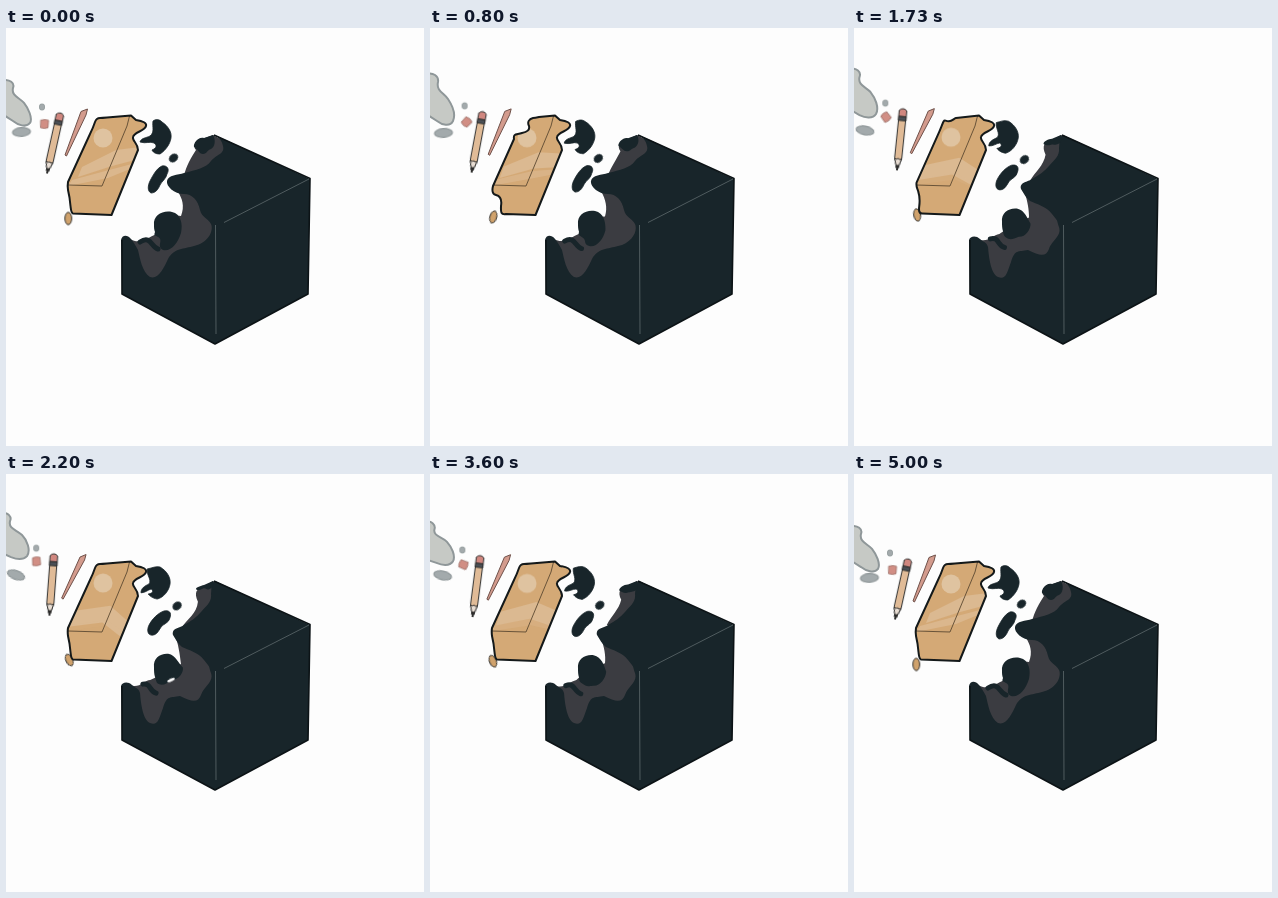
Animation of 418 by 418 pixels, one loop 5.03 s. Source, as an HTML page without scripts:

```html
<!DOCTYPE html>
<html lang="en">
<head>
<meta charset="utf-8">
<title>Dissolving cube</title>
<style>
html, body { margin: 0; width: 100%; height: 100%; overflow: hidden; background: #fdfdfd; }
svg { display: block; width: 100vw; height: 100vh; }

/* Parts that drift there and back */
.sway { animation: 2515ms cubic-bezier(.37,0,.63,1) infinite alternate; }
/* Parts with their own course over the whole loop */
.loop { animation: 5030ms linear infinite; }

.ink { fill: #18252a; }
.line { stroke: #30302f; stroke-width: 1; stroke-linejoin: round; }

.smoke { animation-name: smoke; }
@keyframes smoke {
  16% { d: path("M-4 46C3 44 9 48 8 54C6 63 14 65 18 71C22 77 26 86 23 93C20 99 12 97 7 93L-4 86Z"); }
  25% { d: path("M-4 43C3 41 9 45 7 51C5 59 13 62 17 67C21 73 26 83 23 90C20 97 11 94 6 91L-4 84Z"); }
  44% { d: path("M-4 39C2 38 6 43 4 47C2 55 11 56 16 61C21 66 25 76 21 82C17 86 10 85 5 83L-4 79Z"); }
  60% { d: path("M-4 43C1 43 5 47 3 51C1 58 11 59 16 64C21 69 25 78 22 83C18 87 10 86 5 84L-4 82Z"); }
  84% { d: path("M-4 52C2 51 7 55 6 60C5 67 14 67 18 72C22 77 27 86 24 92C21 98 14 97 8 94L-4 89Z"); }
}
.puff { animation-name: puff; }
@keyframes puff {
  0%, 100% { transform: translate(15.5px,104px) rotate(-4deg); }
  16% { transform: translate(13.5px,105px) rotate(-4deg); }
  25% { transform: translate(12px,104px) rotate(2deg); }
  44% { transform: translate(10px,101px) rotate(20deg); }
  60% { transform: translate(11px,100px) rotate(20deg); }
  84% { transform: translate(14.5px,103px) rotate(4deg); }
}
.speck { animation-name: speck; }
@keyframes speck {
  from { transform: translate(36px,79px); }
  to { transform: translate(30px,74px); }
}
.crumb { animation-name: crumb; }
@keyframes crumb {
  from { transform: translate(38.3px,96px) rotate(5deg); }
  to { transform: translate(30.3px,87px) rotate(185deg); }
}
.pencil { animation-name: pencil; }
@keyframes pencil {
  from { transform: translate(41px,145.5px) rotate(12.5deg); }
  to { transform: translate(43.5px,141.5px) rotate(4deg); }
}
.stick { animation-name: stick; }
@keyframes stick { to { d: path("M74 83L80 80.5L78.5 86L57 125L55.5 124Z"); } }

.box { animation-name: box; }
@keyframes box {
  0%, 38%, 100% { d: path("M84 106C86.5 101 88 97 89 94C90 91 91 90 94 90C96 90 99 89.7 101 89.5L125 87.5L130 92C137 93 141 95 140 98C139 103 128 104 127 109C126 113 132 115 132 122L105.5 187L67 185.5C65 185 65 182 64.5 178C64 172 63 166 62 162C61.5 158 61.5 157 62 154Z"); }
  16% { d: path("M84 111C83 105 87 107 92 105C97 104 100 102 99 98C97 94 99 91 103 90C105 90 107 89.5 109 89L125 87.5L130 92C137 93 141 95 140 98C139 103 128 104 127 109C126 113 132 115 132 122L105.5 187L76 186C70 187 71 183 71 178C72 172 70 168 66 167C62 166 62 162 63 158Z"); }
  25% { d: path("M88 99C88.5 97 89 93 91 92C93 92 90 101 97 102C104 102 101 94 105 91L125 87.5L130 92C137 93 141 95 140 98C139 103 128 104 127 109C126 113 132 115 132 122L105.5 187L71 185.5C65 187 64 182 67 180C71 177 72 171 70 167C68 164 63 165 64 156Z"); }
}
.tape { animation-name: tape; }
@keyframes tape { to { d: path("M67 137L104 132L121 148L114 164L96 149L62 153Z"); } }
.glint { animation-name: glint; }
@keyframes glint { to { d: path("M64 151L101 146L119 160L117 165L100 152L60 157Z"); opacity: 0; } }
.badge { animation-name: badge; }
@keyframes badge { to { transform: translateY(-1px); } }
.drip { animation-name: drip; }
@keyframes drip {
  0%, 100% { transform: translate(62.3px,190.5px) rotate(0deg); }
  16% { transform: translate(63.3px,189px) rotate(16deg); }
  25% { transform: translate(63px,188px) rotate(5deg); }
  44%, 60% { transform: translate(63.3px,186px) rotate(-25deg); }
  84% { transform: translate(62.5px,188.5px) rotate(-18deg); }
}

.claw { animation-name: claw; }
@keyframes claw { to { d: path("M141 95C147 94 149 92 154 93C161 97 165 104 164 110C163 117 157 124 151 125C146 124 144 122 142 120C148 119 147 116 145 115C142 116 139 119 135 119C135 114 139 112 143 110C146 106 140 101 141 95Z"); } }
.dot { animation-name: dot; }
@keyframes dot { to { transform: translate(171.2px,132px) rotate(-40deg); } }
.bean { animation-name: bean; }
@keyframes bean { to { d: path("M158 137C163 136 166 138 164 144C163 149 157 150 155 153C152 158 150 161 146 161C141 161 141 155 143 151C146 145 152 139 158 137Z"); } }

.hollow { animation-name: hollow; }
@keyframes hollow { to { d: path("M124 211C133 215 138 206 144 206L158 200L175 190C174 184 173 174 170 164L190 153L176 153C181 146 191 140 192 128C188 118 190 115 199 112L207 107L220 114L218 130L215 200L200 232L150 258L125 240Z"); } }
.cube { animation-name: cube; }
@keyframes cube { to { d: path("M209 107L304 151L302 266L209 316L116 266L115 212C116 208 122 207 126 211C130 215 132 213 134 219C135 230 137 246 144 249C152 252 153 245 157 234C161 221 164 224 174 222C186 228 192 229 195 221C198 212 208 208 205 199C202 190 205 195 198 186C192 178 182 176 176 173C172 170 170 166 167 161C165 154 174 154 178 151C185 147 191 143 195 138C200 132 206 128 205 120C206 113 204 111 209 107Z"); } }
.cap { animation-name: cap; }
@keyframes cap { to { d: path("M207 107C209 111 206 114 203 115C200 116 200 113 197 114C195 115 193 117 190 115C190 113 195 112 198 111Z"); } }
.bump { animation-name: bump; }
@keyframes bump { to { d: path("M148 193C147 184 154 179 162 179.5C170 181 172 189 177 193C178 198 173 205 167 205C161 209 156 213 151 209C150 207 150 206 149 203C148 200 148 196 148 193Z"); } }
.lip { animation-name: lip; }
@keyframes lip { to { d: path("M137 210C145 209 143 217 150 219"); } }
.gap { animation-name: gap; }
@keyframes gap {
  from, 81% { transform: translate(165px,206px) rotate(-25deg) scale(0); }
  87%, to { transform: translate(165px,206px) rotate(-25deg) scale(1); }
}
</style>
</head>
<body>
<svg viewBox="0 0 418 418">
  <defs>
    <clipPath id="inside">
      <path class="box loop" d="M84 107Z"/>
    </clipPath>
  </defs>

  <g fill="#a3aaac" stroke="#8f9799" stroke-width="1.2">
    <path class="smoke loop" fill="#c6c9c5" stroke-width="2" d="M-4 52C4 51 9 55 7 60C5 68 14 70 18 75C22 80 27 90 24 95C20 100 12 97 7 93L-4 86Z"/>
    <ellipse class="puff loop" rx="9" ry="4.3"/>
    <rect class="speck sway" x="-2.5" y="-3" width="5" height="6" rx="2" stroke-width=".8"/>
  </g>

  <path class="crumb sway" d="M-4-3.5Q0-5 4-4L4 3.5Q1 5-3.5 4Z" fill="#d18e84" stroke="#9d716a" stroke-width=".8"/>

  <g class="pencil sway line">
    <path d="M0 0L-3.6-13V-54H3.6V-13Z" fill="#e0bb97"/>
    <path d="M-3.6-12Q-2-10 0-12Q2-10 3.6-12L0 0Z" fill="#e8ddd3"/>
    <path d="M-1.5-5H1.5L0 0Z" fill="#242424"/>
    <path d="M-3.8-54V-60Q0-64 3.8-60V-54Z" fill="#d0877f"/>
    <path d="M-3.8-54H3.8V-50H-3.8Z" fill="#4a4f55"/>
  </g>
  <path class="stick sway" d="M75 83.5L81.5 81L80 87L60.5 128L59 127Z" fill="#d39b8d" stroke="#6e5049" stroke-width="1"/>

  <ellipse class="drip loop line" rx="3.4" ry="6.2" fill="#d0a26c"/>
  <g clip-path="url(#inside)">
    <path d="M58 84H142V190H58Z" fill="#d4a976"/>
    <path class="tape sway" d="M76 139L110 122L134 119L129 132L106 138L72 149Z" fill="#debd98" opacity=".8"/>
    <path class="glint sway" d="M66 152L103 142L126 136L124 141L102 150L62 158Z" fill="#debd98" opacity=".7"/>
    <circle class="badge sway" cx="97" cy="110" r="9.5" fill="#dfc3a0"/>
    <path d="M123.5 88L121 98L96 158L62 157" fill="none" stroke="#5d4a33" stroke-width=".9"/>
  </g>
  <path class="box loop" d="M84 107Z" fill="none" stroke="#14191a" stroke-width="2" stroke-linejoin="round"/>

  <g class="ink" stroke="#18252a" stroke-width=".8">
    <path class="claw sway" d="M147 93C150 91 153 91 156 94C162 98 166 104 165 110C164 116 160 122 154 126C149 126 147 124 146 122C151 120 151 117 148 115C144 113 140 116 134 114C135 110 140 110 144 108C149 104 146 99 147 93Z"/>
    <ellipse class="dot sway" transform="translate(167.5 130) rotate(-40)" rx="4.5" ry="3.5"/>
    <path class="bean sway" d="M156 138C161 137 164 141 161 146C160 151 156 153 154 157C152 162 149 165 145 165C141 163 142 157 144 153C147 147 151 140 156 138Z"/>
  </g>

  <path class="hollow sway" fill="#3b3c41" d="M124 211C134 217 142 210 150 206L160 186L175 188C179 178 176 170 172 164L200 150L178 148C180 138 186 128 190 122C186 118 190 109 199 110L207 107L220 114L218 130L215 200L200 232L150 258L125 240Z"/>
  <path class="cube sway ink" d="M209 107L304 151L302 266L209 316L116 266L115 212C116 207 121 206 125 211C128 215 130 218 132 222C134 230 136 244 144 249C152 252 158 240 162 231C168 220 178 221 188 218C202 215 208 203 205 196C202 190 196 190 194 182C192 172 186 166 178 166C168 166 160 158 161 153C162 147 172 147 178 145C190 142 200 140 205 133C211 126 219 126 217 118C216 112 212 109 209 107Z"/>
  <path class="cap sway ink" d="M207 107C210 112 209 119 205 121C201 122 201 126 197 126C193 126 192 121 188 119C187 115 193 108 198 110Z"/>
  <path class="lip sway" d="M134 214C145 207 145 219 152 221" fill="none" stroke="#18252a" stroke-width="5" stroke-linecap="round"/>
  <path class="bump sway ink" d="M148 197C147 187 157 182 166 184C175 186 177 196 175 205C172 215 165 224 157 222C150 218 158 212 152 209C148 207 148 207 149 204C148 202 148 199 148 197Z"/>
  <ellipse class="gap sway" rx="4" ry="1.6" fill="#fdfdfd"/>

  <g fill="none">
    <path d="M208 107L304 150.5L302 266L209 316L116 266V212" stroke="#0c1316" stroke-width="1.6" stroke-linejoin="round"/>
    <path d="M218 194.5L303 151M209.5 197L210 306" stroke="#505c5f"/>
  </g>
</svg>
</body>
</html>
```
